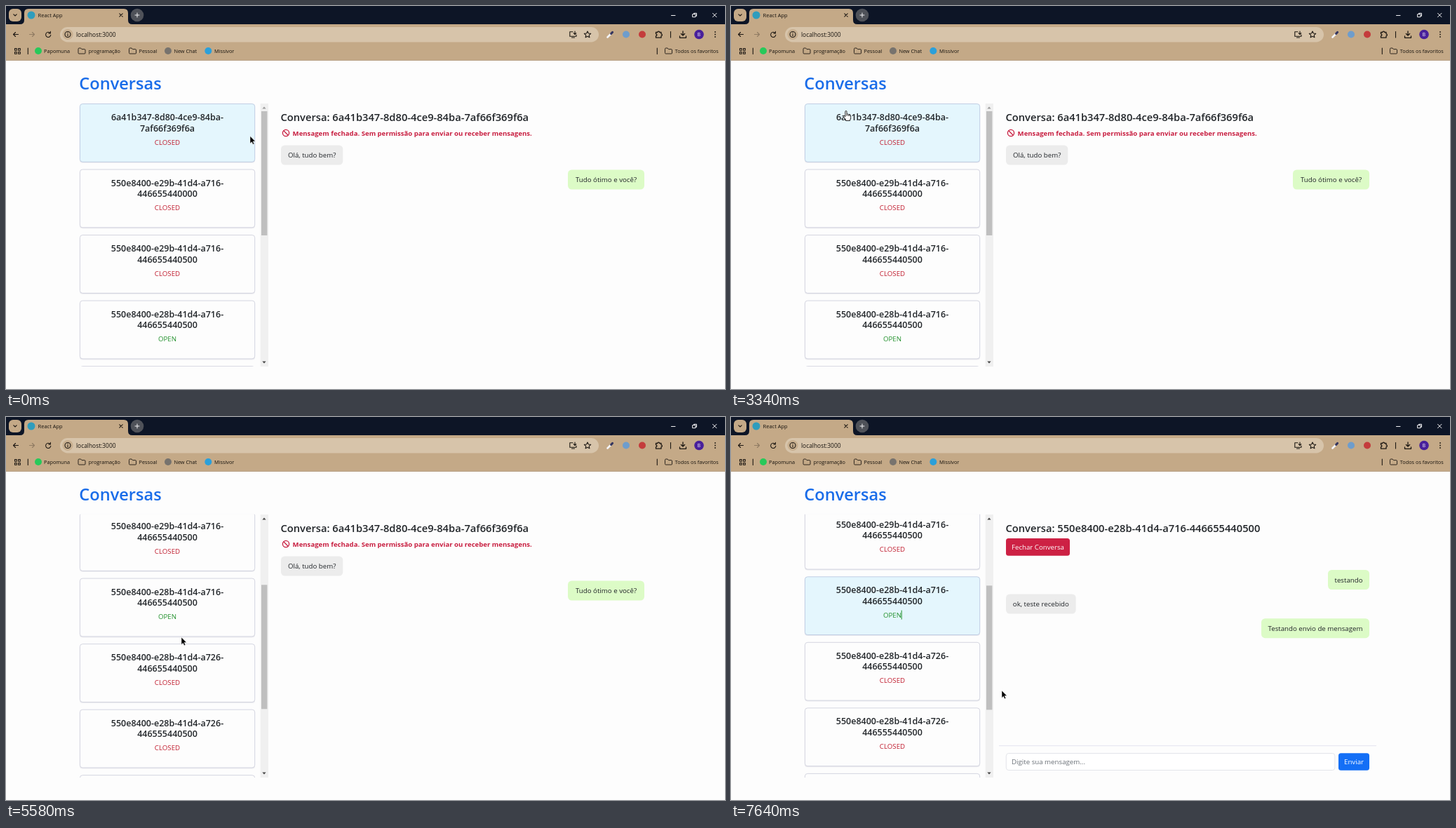
An HTML page that plays this animation: 1025x546 px, repeating every 8 s.

```html
<!DOCTYPE html>
<html lang="pt-BR">
<head>
<meta charset="utf-8">
<title>Conversas</title>
<style>
  html, body { margin: 0; width: 100%; height: 100%; overflow: hidden; background: #fdfdfd; }
  svg { display: block; width: 100%; height: 100%; }
  text { font: 9.7px "Open Sans", "Noto Sans", sans-serif; fill: #212529; }
  .ui { font-size: 7.3px; fill: #17130e; }
  .h1 { font-size: 23.6px; font-weight: 600; fill: #196ce9; }
  .h4 { font-size: 14.7px; font-weight: 600; }
  .id { font-size: 12.5px; font-weight: 600; text-anchor: middle; }
  .status { text-anchor: middle; }
  .warn { font-size: 9.6px; font-weight: 700; fill: #c81e40; }
  .line { fill: none; stroke: #1d1813; stroke-width: 1.1; stroke-linecap: round; stroke-linejoin: round; }
  .white { stroke: #f2f2f4; stroke-width: 1; }
</style>
</head>
<body>
<svg viewBox="0 0 1025 546">
  <defs>
    <path id="folder" class="line" style="stroke-width:.9" d="M0 1.2Q0 0 1.2 0H3.6L5 1.6H8.8Q10 1.6 10 2.8V7Q10 8 9 8H1Q0 8 0 7Z"/>
    <clipPath id="listClip"><rect x="100" y="138.8" width="262" height="375.2"/></clipPath>
  </defs>
  <rect width="1025" height="546" fill="#fdfdfd"/>

  <!-- browser window -->
  <rect width="1025" height="27" fill="#0d1526"/>
  <rect y="26" width="1025" height="51.5" fill="#c4a987"/>
  <path d="M0 77.5H1025" stroke="#b09a7e" stroke-width=".8"/>
  <path d="M20 26Q26 26 26 20V10Q26 4 32 4H168Q174 4 174 10V20Q174 26 180 26Z" fill="#c4a987"/>
  <rect x="4" y="4" width="18" height="18" rx="6" fill="#c4a987"/>
  <path class="line" d="M10.8 11.8l2.2 2.2 2.2-2.2"/>
  <circle cx="36" cy="13" r="5.5" fill="#2f9dbd"/>
  <text class="ui" x="45.6" y="15.8" style="font-size:7.5px">React App</text>
  <path class="line" d="M161.8 10.8l4.4 4.4m0-4.4l-4.4 4.4"/>
  <circle cx="187" cy="13" r="9.3" fill="#4f5259"/>
  <path class="line white" d="M184 13h6m-3-3v6"/>
  <path class="line white" d="M948.5 13.5h5.5M979 11.7h4v4h-4zM980.5 11.5V10.3h4v4h-1.2M1007.5 10.3l5.5 5.5m0-5.5l-5.5 5.5"/>

  <path class="line" d="M17.5 40.5h-7m3-3l-3 3 3 3"/>
  <path class="line" style="stroke:#8f7b62" d="M33.5 40.5h7m-3-3l3 3-3 3"/>
  <path class="line" d="M63 38.6A3.6 3.6 0 1 0 63.8 41.3M63.4 36.4v2.5h-2.5"/>
  <rect x="77" y="30" width="768" height="21.4" rx="10.7" fill="#d7c4aa"/>
  <circle cx="88" cy="40.5" r="7.6" fill="#c8af8f"/>
  <circle class="line" cx="88" cy="40.5" r="4"/>
  <path class="line" d="M88 40.2v2.2M88 38.4v.1"/>
  <text class="ui" x="100" y="43.6" style="font-size:8.4px">localhost:3000</text>
  <path class="line" d="M808 36.8h-4.2v6.4h9.2v-2.2M806.5 45h4M811 36v4.4m-1.8-1.7l1.8 1.8 1.8-1.8"/>
  <path class="line" d="M829 36l1.4 3 3.3.4-2.5 2.2.7 3.2-2.9-1.6-2.9 1.6.7-3.2-2.5-2.2 3.3-.4z"/>
  <path d="M857.5 44.5l5-5" stroke="#f4f4f7" stroke-width="2.6" stroke-linecap="round"/>
  <path d="M862.6 39.4l2-2" stroke="#34355e" stroke-width="3" stroke-linecap="round"/>
  <circle cx="884" cy="40.5" r="5" fill="#6e9dcc"/>
  <circle cx="907" cy="40.5" r="5" fill="#c43c3c"/>
  <path class="line" style="stroke-width:1.3" d="M926.5 37.5h2.4a1.4 1.4 0 0 1 2.8 0h2.3v2.3a1.4 1.4 0 0 1 0 2.8v2.6h-7.5v-2.6a1.4 1.4 0 0 0 0-2.8z"/>
  <path class="line" d="M947.5 36.5v8.5"/>
  <path class="line" style="stroke-width:1.3" d="M965 36v6m-2.6-2.5l2.6 2.6 2.6-2.6M960.5 43v2.3h9V43"/>
  <circle cx="988" cy="40.5" r="6.8" fill="#49209b"/>
  <text class="ui" x="988" y="43" text-anchor="middle" style="font-size:6.6px;fill:#fff">B</text>
  <path class="line" style="stroke-width:1.8" d="M1011 37v0M1011 40.5v0M1011 44v0"/>

  <path class="line" d="M12.5 60.5h2.7v2.7h-2.7zM17.6 60.5h2.7v2.7h-2.7zM12.5 65.5h2.7v2.7h-2.7zM17.6 65.5h2.7v2.7h-2.7zM31.3 60v8.5M928.3 60v8.5"/>
  <circle cx="46" cy="64" r="5" fill="#27c95a"/>
  <text class="ui" x="54" y="66.6">Papomuna</text>
  <use href="#folder" x="103" y="60"/>
  <text class="ui" x="117.6" y="66.6">programação</text>
  <use href="#folder" x="175.5" y="60"/>
  <text class="ui" x="189.6" y="66.6">Pessoal</text>
  <circle cx="231" cy="64" r="5" fill="#77736e"/>
  <text class="ui" x="239.4" y="66.6">New Chat</text>
  <circle cx="288.3" cy="64" r="5" fill="#2ba0da"/>
  <text class="ui" x="297" y="66.6">Missivor</text>
  <use href="#folder" x="939.5" y="60"/>
  <text class="ui" x="953.8" y="66.6">Todos os favoritos</text>

  <!-- conversation list -->
  <text class="h1" x="104.3" y="118.8">Conversas</text>
  <g clip-path="url(#listClip)"><g id="list"></g></g>
  <rect x="362.7" y="139" width="11.3" height="375" fill="#f0f0f0"/>
  <rect id="thumb" x="364" y="150" width="8.4" height="177" fill="#bfbfbf"/>
  <path id="up" d="M365.4 146.6h5.2l-2.6-3z"/>
  <path d="M365.4 506.6h5.2l-2.6 3z" fill="#444"/>

  <!-- conversation panels -->
  <g id="closedPanel">
    <text class="h4" x="391.5" y="164.4">Conversa: 6a41b347-8d80-4ce9-84ba-7af66f369f6a</text>
    <g fill="none" stroke="#c81e40" stroke-width="1.3"><circle cx="399" cy="181" r="4.6"/><path d="M395.8 177.8l6.4 6.4"/></g>
    <text class="warn" x="408.6" y="184.7">Mensagem fechada. Sem permissão para enviar ou receber mensagens.</text>
  </g>
  <g id="openPanel">
    <text class="h4" x="391.5" y="164.4">Conversa: 550e8400-e28b-41d4-a716-446655440500</text>
    <rect x="392" y="173" width="91" height="24.8" rx="3.6" fill="#cd2144"/>
    <text x="437.5" y="189" text-anchor="middle" style="fill:#fff">Fechar Conversa</text>
    <path d="M382 468.7H920" stroke="#e2e3ee" stroke-width=".9"/>
    <rect x="392.3" y="479.5" width="468.6" height="24" rx="3.6" fill="#fff" stroke="#dcdfe5" stroke-width=".8"/>
    <text x="400" y="495" style="fill:#6a7077">Digite sua mensagem...</text>
    <rect x="866" y="479.2" width="44" height="24.6" rx="3.6" fill="#146ff6"/>
    <text x="888" y="495" text-anchor="middle" style="fill:#fff">Enviar</text>
  </g>

  <g id="cursor">
    <path id="arrow" d="M0 0V10.4L2.4 8.2 4 11.8 5.8 11 4.2 7.5H7.4Z" fill="#000" stroke="#fff" stroke-width=".5"/>
    <path id="hand" d="M-1.1 1.1Q-1.1 0 0 0T1.1 1.1V4.6Q2.8 4 3.3 5.2 4.9 4.7 5.2 6 6.7 5.8 6.7 7.2V10Q6.7 11.6 5.7 12.6V14H-.4V12.6L-3.4 8.6Q-3.8 7.4-2.8 7.1-2 7-1.1 8.2ZM1.1 4.8V7.2M3.3 5.4V7.4M5.2 6.2V7.6"
      fill="#fff" stroke="#111" stroke-width=".9" stroke-linejoin="round"/>
  </g>
</svg>
<script>
const LOOP = 8000, OPENED_AT = 7250;
const TOP = 139.3, PITCH = 93.53, CARD_H = 83.2;
const $ = id => document.getElementById(id);
const show = (id, visible) => $(id).style.display = visible ? '' : 'none';

const cards = [
  ['6a41b347-8d80-4ce9-84ba-', '7af66f369f6a'],
  ['550e8400-e29b-41d4-a716-', '446655440000'],
  ['550e8400-e29b-41d4-a716-', '446655440500'],
  ['550e8400-e28b-41d4-a716-', '446655440500', 'OPEN'],
  ['550e8400-e28b-41d4-a726-', '446655440500'],
  ['550e8400-e28b-41d4-a726-', '446555440500'],
  ['556e8400-e28b-41d4-a726-', '446555440500'],
  ['556e8400-e28b-42d4-a726-', '446555440500']
];

$('list').innerHTML = cards.map(([head, tail, status = 'CLOSED'], i) => `
  <g transform="translate(0 ${TOP + i * PITCH})">
    <rect x="105" y="1.3" width="250" height="${CARD_H}" rx="4" fill="#ececf0"/>
    <rect class="card" x="105.4" y=".2" width="249.3" height="${CARD_H - .4}" rx="3.8" stroke-width=".8"/>
    <text class="id" x="230" y="23.8">${head}</text>
    <text class="id" x="230" y="39.3">${tail}</text>
    <text class="status" x="230" y="58.3" style="fill:${status === 'OPEN' ? '#22912c' : '#c01c2e'}">${status}</text>
    ${status === 'OPEN' ? '<path id="caret" d="M243.2 48v13" stroke="#22912c"/>' : ''}
  </g>`).join('');
const cardRects = document.querySelectorAll('.card');

function addBubble(panel, x, y, width, sent, message) {
  $(panel).insertAdjacentHTML('beforeend', `
    <rect x="${x}" y="${y}" width="${width}" height="28" rx="5.4" fill="${sent ? '#dcfbc6' : '#ececec'}"/>
    <text x="${x + width / 2}" y="${y + 17.8}" text-anchor="middle">${message}</text>`);
}
addBubble('closedPanel', 392, 198.5, 88.3, false, 'Olá, tudo bem?');
addBubble('closedPanel', 801, 233.5, 109, true, 'Tudo ótimo e você?');
addBubble('openPanel', 851, 218, 59, true, 'testando');
addBubble('openPanel', 392, 252.5, 99.7, false, 'ok, teste recebido');
addBubble('openPanel', 756, 287.2, 154, true, 'Testando envio de mensagem');

// Moves: [start, end, ...destination]; the value rests between moves.
const pointerMoves = [
  [35, 140, 560, 190],
  [640, 670, 640, 194],
  [1035, 1200, 877, 202],
  [1740, 1770, 870, 203],
  [1870, 2410, 166, 150],
  [3310, 3340, 164, 149.5],
  [3340, 3510, 158, 150],
  [3835, 3940, 100, 262],
  [4210, 4240, 83, 305],
  [4240, 4370, 241.5, 312],
  [5450, 5580, 250, 314],
  [7045, 7200, 252, 283],
  [7475, 7640, 386, 390]
];
const scrollMoves = [
  [4950, 4980, 320.3],
  [4980, 5010, 373],
  [5450, 5580, 190],
  [6005, 6110, 0],
  [6280, 6410, 192.3]
];

function follow(start, moves, t) {
  let from = start;
  for (const [t0, t1, ...to] of moves) {
    if (t < t0) break;
    const k = Math.min(1, (t - t0) / (t1 - t0));
    from = from.map((v, i) => v + (to[i] - v) * k);
  }
  return from;
}

function draw(t) {
  const [x, y] = follow([348, 185.5], pointerMoves, t);
  const [scroll] = follow([0], scrollMoves, t);
  const opened = t >= OPENED_AT;

  $('list').setAttribute('transform', `translate(0 ${-scroll})`);
  $('thumb').setAttribute('y', 150 + scroll * .47);
  $('up').setAttribute('fill', scroll > 0 || t >= 6040 ? '#444' : '#999');
  cardRects.forEach((card, i) => {
    const selected = i === (opened ? 3 : 0);
    card.setAttribute('fill', selected ? '#e4f6fd' : '#fdfdfd');
    card.setAttribute('stroke', selected ? '#b5c3de' : '#cbccda');
  });

  show('closedPanel', !opened);
  show('openPanel', opened);
  show('caret', opened);

  const overCard = x > 105 && x < 345 && y > TOP && y < 514 && (y - TOP + scroll) % PITCH < CARD_H;
  show('hand', overCard);
  show('arrow', !overCard);
  $('cursor').setAttribute('transform', `translate(${x} ${y})`);
}

const began = performance.now();
function tick() {
  draw((performance.now() - began) % LOOP);
  requestAnimationFrame(tick);
}
tick();
</script>
</body>
</html>
```
